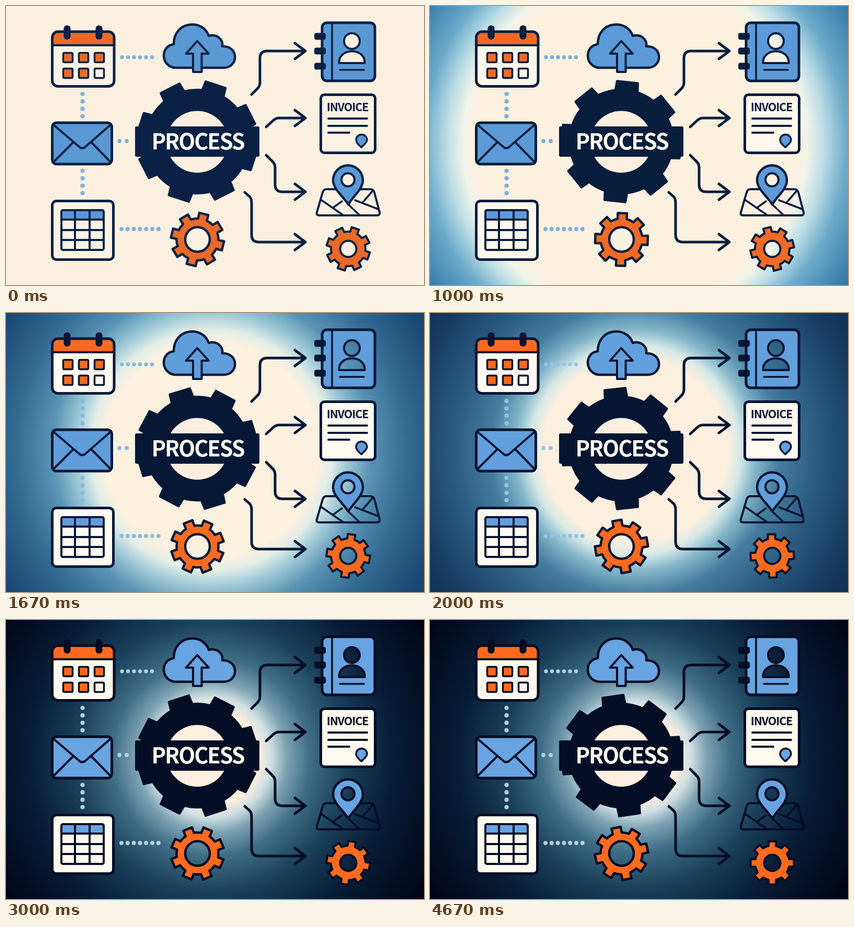
An HTML page with a canvas for the animation above (5010 ms loop, 800 by 533 pixels).

```html
<!DOCTYPE html>
<html lang="en">
<head>
<meta charset="utf-8">
<title>Process</title>
<style>
  html, body { margin: 0; width: 100%; height: 100%; overflow: hidden; background: #fbf0e0; }
  canvas { position: absolute; left: 0; top: 0; width: 800px; height: 533px; }
  span {
    position: absolute; transform: translate(-50%, -50%); white-space: nowrap;
    font-family: "Noto Sans CJK JP", "Noto Sans CJK SC", "Open Sans", sans-serif;
    font-weight: 700; line-height: 1; letter-spacing: -0.05em;
  }
  #process { left: 367px; top: 257px; font-size: 43px; color: #fff8ee; }
  #invoice { left: 653.5px; top: 191.5px; font-size: 24px; }
</style>
</head>
<body>
<canvas id="stage"></canvas>
<span id="process">PROCESS</span>
<span id="invoice">INVOICE</span>
<script>
const LOOP = 5010, STEPS = 15, TURN = 11;
const canvas = document.getElementById('stage');
const ctx = canvas.getContext('2d');
const invoice = document.getElementById('invoice');
const dpr = window.devicePixelRatio || 1;
canvas.width = 800 * dpr;
canvas.height = 533 * dpr;

// Radius of the light circle at each step; the last one holds
const RADII = [560, 480, 385, 305, 238, 205, 176, 138, 110, 90, 84, 82];
// Distances beyond the light circle where the backdrop colours sit
const OFFSETS = [0, 25, 55, 100, 170, 260, 390];
const LOOKS = [
  { at: 0, line: '#0a2145', blue: '#5a98d4', orange: '#ea6a28', paper: '#fcf3e5', dot: '#7db2de',
    sky: ['#fbf0e0', '#eef2ea', '#bfe0e8', '#5fa8cc', '#3a86b4', '#286c9e', '#1c5484'] },
  { at: 4, line: '#081b3a', blue: '#5d9bd8', orange: '#f36a24', paper: '#fffaf0', dot: '#78b0dc',
    sky: ['#fcf0df', '#f0f3e8', '#bcdde4', '#6fa9c8', '#3a7aa6', '#1f5688', '#123f6c'] },
  { at: 6, line: '#061531', blue: '#629fdd', orange: '#fa6a20', paper: '#fffaf0', dot: '#93c2e3',
    sky: ['#fcefde', '#d6e9e6', '#84b6ca', '#457d9f', '#2c5c80', '#173a60', '#0a2448'] },
  { at: 9, line: '#030d24', blue: '#68a3e2', orange: '#ff6a1e', paper: '#fffaee', dot: '#b2d0e0',
    sky: ['#fdeedd', '#cfdfe2', '#7ca2b2', '#3f6c86', '#1a405a', '#081c36', '#010616'] }
];

const mixHex = (a, b, p) => {
  const part = (s, i) => parseInt(s.slice(i, i + 2), 16);
  return 'rgb(' + [1, 3, 5].map(i => Math.round(part(a, i) + (part(b, i) - part(a, i)) * p)) + ')';
};

function lookAt(step) {
  let i = 0;
  while (i < LOOKS.length - 2 && step >= LOOKS[i + 1].at) i++;
  const a = LOOKS[i], b = LOOKS[i + 1];
  const p = Math.min(1, (step - a.at) / (b.at - a.at));
  const look = { sky: a.sky.map((c, n) => mixHex(c, b.sky[n], p)) };
  for (const key of ['line', 'blue', 'orange', 'paper', 'dot']) look[key] = mixHex(a[key], b[key], p);
  return look;
}

function backdrop(step, look) {
  const r = RADII[Math.min(step, RADII.length - 1)];
  const end = r + OFFSETS[OFFSETS.length - 1];
  const g = ctx.createRadialGradient(393, 262, 0, 393, 262, end);
  g.addColorStop(0, look.sky[0]);
  OFFSETS.forEach((d, i) => g.addColorStop((r + d) / end, look.sky[i]));
  return g;
}

let ink;
function paint(path, fill, width = 4.5) {
  if (fill) { ctx.fillStyle = fill; ctx.fill(path); }
  if (width) { ctx.strokeStyle = ink; ctx.lineWidth = width; ctx.stroke(path); }
}
const shape = (d, fill, width) => paint(new Path2D(d), fill, width);
function box(x, y, w, h, r, fill, width) {
  const p = new Path2D();
  p.roundRect(x, y, w, h, r);
  paint(p, fill, width);
}
function disc(x, y, r, fill, width) {
  const p = new Path2D();
  p.arc(x, y, r, 0, 7);
  paint(p, fill, width);
}
function dots(x, y, dx, dy, n, r, color) {
  for (let i = 0; i < n; i++) disc(x + dx * i, y + dy * i, r, color, 0);
}

function gear(x, y, outer, inner, angle, fill, width) {
  const p = new Path2D();
  const point = (r, deg) => {
    const a = (deg - 90) * Math.PI / 180;
    p.lineTo(x + r * Math.cos(a), y + r * Math.sin(a));
  };
  for (let i = 0; i < 8; i++) {
    const mid = angle + i * 45;
    point(inner, mid - 12.5);
    point(outer, mid - 10);
    point(outer, mid + 10);
    point(inner, mid + 12.5);
    for (let d = 16; d < 32; d += 4) point(inner, mid + d);
  }
  p.closePath();
  paint(p, fill, width);
}

function calendar(c) {
  box(88.5, 49, 118.5, 104.5, 11, c.paper, 0);
  ctx.save();
  ctx.beginPath();
  ctx.roundRect(88.5, 49, 118.5, 104.5, 11);
  ctx.clip();
  ctx.fillStyle = c.orange;
  ctx.fillRect(88, 49, 120, 26);
  ctx.restore();
  shape('M89 75H207', null, 4);
  box(88.5, 49, 118.5, 104.5, 11, null, 5);
  for (const x of [117, 178]) box(x - 6.5, 37, 13, 27, 6, ink, 0);
  for (let i = 0; i < 6; i++) {
    box(109.5 + i % 3 * 30, 89.5 + Math.floor(i / 3) * 30, 18, 18, 2, i < 5 ? c.orange : c.paper, 3.5);
  }
}

function mail(c) {
  box(88.5, 223, 114, 79, 8, c.blue, 5);
  shape('M91 227L139 268Q146 275 153 268L200 227M91 298L128 261M200 298L164 261', null, 4);
}

function sheet(c) {
  box(88.5, 372.5, 117, 112, 8, c.paper, 5);
  box(106, 390, 81, 76, 3, c.paper, 0);
  ctx.fillStyle = c.blue;
  ctx.fillRect(106, 390, 81, 18);
  shape('M106 408H187M106 428H187M106 447H187M132 390V466M160 390V466', null, 4);
  box(106, 390, 81, 76, 3, null, 4);
}

function cloud(c) {
  shape('M326 118C297 118 293 77 321 73C321 28 377 24 388 57C404 53 416 64 414 77C446 76 446 118 416 118Z', c.blue);
  shape('M366 67L388 91H374.5V126H358V91H344.5Z', c.blue, 4);
}

function contacts(c, sky) {
  box(605, 32, 101, 111, 9, c.blue, 5);
  shape('M624 32V142', null, 3.5);
  for (const y of [58, 86, 115]) box(590, y - 6.5, 22, 13, 4, ink, 0);
  disc(662, 67, 15, sky, 4);
  shape('M637.5 109C636 79 688 79 686.5 109Z', sky, 4);
  shape('M639 122H685', null, 3.5);
}

function bill(c) {
  box(602.5, 169.5, 104, 111, 7, c.paper, 5);
  shape('M617 215H691M617 229H691M617 242H657', null, 4);
  shape('M680 270C673 264 670 260 670 256A10.5 10.5 0 0 1 691 256C691 260 687 264 680 270Z', c.blue, 3.5);
}

function map(c, sky) {
  shape('M613 350H697Q703 350 705 356L715 394Q716 400 710 400H600Q593 400 595 394L606 356Q608 350 613 350Z', sky, 4);
  shape('M604 371L646 400M625 386L643 373M656 380L677 400M668 371L712 388M682 376L701 354', null, 3.5);
  shape('M655 379C646 364 626 350 626 333A28.5 28.5 0 0 1 683 333C683 350 664 364 655 379Z', c.blue);
  disc(654.5, 332, 12.5, sky, 4);
}

function arrows() {
  const tails = [
    [86, 'M470 169L481 158Q486 153 486 146V100Q486 86 500 86H572'],
    [214, 'M498 231L511 219Q516 214 523 214H572'],
    [355, 'M498 285L509 296Q515 301 515 309V341Q515 355 529 355H572'],
    [451, 'M457 356L466 364Q470 368 470 376V437Q470 451 484 451H572']
  ];
  for (const [y, d] of tails) shape(`${d}M553 ${y - 15}L573 ${y}L553 ${y + 15}`, null, 5);
}

function processGear(angle) {
  gear(366, 259, 116, 99, angle, ink, 4);
  disc(366, 259.5, 59, '#fcefe0', 0);
  box(247, 230, 238, 58, 3, ink, 0);
}

function draw(step) {
  const c = lookAt(step), sky = backdrop(step, c), turn = step * TURN;
  ink = c.line;
  invoice.style.color = ink;
  ctx.setTransform(dpr, 0, 0, dpr, 0, 0);
  ctx.lineCap = ctx.lineJoin = 'round';
  ctx.fillStyle = sky;
  ctx.fillRect(0, 0, 800, 533);

  dots(222, 98, 11.5, 0, 6, 3.7, c.dot);
  dots(146.5, 168, 0, 14.2, 4, 4.1, c.dot);
  dots(146.5, 315, 0, 14.2, 4, 4.1, c.dot);
  dots(217, 258, 14, 0, 2, 3.9, c.dot);
  dots(221, 426, 11.8, 0, 7, 3.9, c.dot);

  calendar(c);
  mail(c);
  sheet(c);
  cloud(c);
  arrows();
  contacts(c, sky);
  bill(c);
  map(c, sky);
  processGear(18 + turn);
  gear(366.5, 446, 51, 40, 14 + turn, c.orange, 4.5);
  disc(366.5, 446, 23.5, sky, 4.5);
  gear(655, 464, 42, 33, 19 - turn, c.orange, 4);
  disc(655, 464, 15.5, sky, 4);
}

// Shrinks a label until it is no wider than its place
function fit(id, max) {
  const el = document.getElementById(id);
  let size = parseFloat(getComputedStyle(el).fontSize);
  while (size > 10 && el.offsetWidth > max) el.style.fontSize = (size -= 0.5) + 'px';
}

const startOf = step => 10 * Math.round(step * 100 / 3);
function tick() {
  const t = performance.now() % LOOP;
  let step = STEPS - 1;
  while (step > 0 && t < startOf(step)) step--;
  draw(step);
  requestAnimationFrame(tick);
}

fit('process', 177);
fit('invoice', 80);
tick();
</script>
</body>
</html>
```
